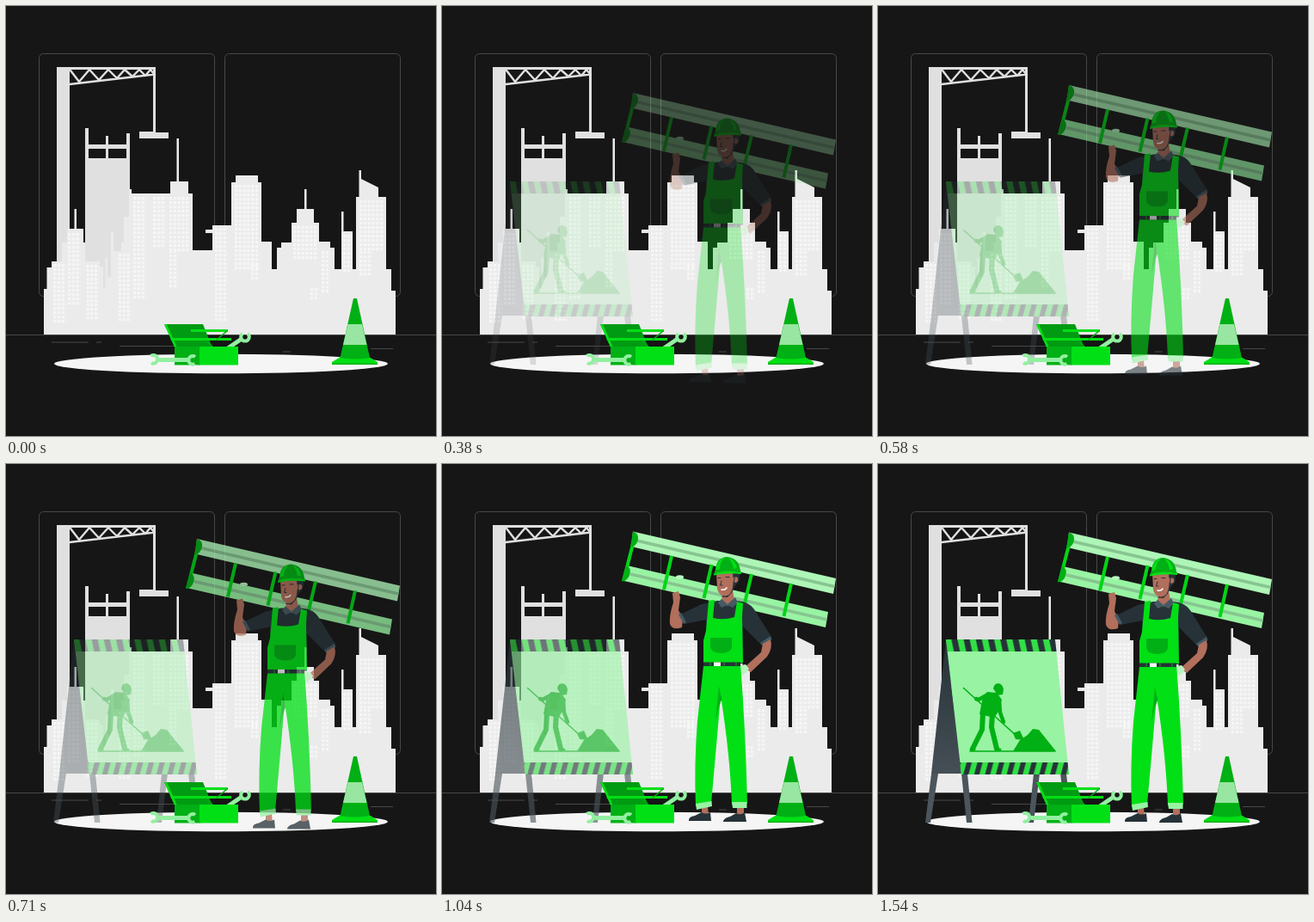
An HTML page that plays this animation: 500x500 px, repeating every 1620 ms.

```html
<!DOCTYPE html>
<html lang="en">
<head>
<meta charset="utf-8">
<title>Under construction</title>
<style>
  html, body { margin: 0; width: 100%; height: 100%; overflow: hidden; background: #161616; }
  svg { display: block; width: 100%; height: 100%; }
  .dark { fill: #263238; }
  .slate { fill: #455a64; }
  .lime { fill: #00e015; }
  .green { fill: #00b014; }
  .pale { fill: #98f3a3; }
  .skin { fill: #b16f5c; }
  .line { fill: none; stroke-linecap: round; stroke-linejoin: round; }
</style>
</head>
<body>
<svg viewBox="0 0 500 500">
  <defs>
    <pattern id="panes" width="4.8" height="5" patternUnits="userSpaceOnUse">
      <rect width="3.2" height="3.2" fill="#f6f6f6"/>
    </pattern>
    <pattern id="topTape" width="14.2" height="14" x="80" y="204" patternUnits="userSpaceOnUse" patternTransform="skewX(12) translate(-43 0)">
      <rect width="14.2" height="14" fill="#32e045"/><rect x="5" width="7" height="14" class="dark"/>
    </pattern>
    <pattern id="lowTape" width="12.6" height="14" x="97" y="347" patternUnits="userSpaceOnUse" patternTransform="skewX(-15) translate(93 0)">
      <rect width="12.6" height="14" fill="#32e045"/><rect x="6" width="6" height="14" class="dark"/>
    </pattern>
    <linearGradient id="side" x2="0" y2="1">
      <stop stop-color="#263238"/><stop offset="1" stop-color="#454f55"/>
    </linearGradient>
  </defs>

  <g fill="none" stroke="#484848">
    <rect x="38.5" y="55.5" width="204" height="282" rx="5"/>
    <rect x="254.5" y="55.5" width="204" height="282" rx="5"/>
    <path d="M0 382.5H500M53 391H96M105 391H111M132 395.500H200M322 402H331M424 398.500H450"/>
  </g>

  <!-- crane and unfinished tower -->
  <g fill="#e0e0e0">
    <path d="M59 71H174V147H189V154H155V146H171V74H74V382H59Z"/>
    <path class="line" stroke="#e0e0e0" stroke-width="2.400" d="M74 91L173 79.500M75 75L85 88L97 74L108 86L119 74L129 84L138 74L147 82L155 74L162 81L168 74L172 79"/>
    <path d="M92 142H96V161H116V151H119V161H140V148H144V382H92ZM96 166V177H116V166ZM119 166V177H140V166Z" fill-rule="evenodd"/>
  </g>

  <!-- skyline -->
  <path fill="#ebebeb" d="M44 382V329H47.500V304H53V297H65V275H71V259H79.500V236H82V259H90V275H92V297H109V303H113V328H115.500V293H118V315H122V262H125V285H130V285H134V275H137V245H143V213H146V218H191V204H198.500V154H201V204H212V218H217V284H240V264H232V260H240V255H262V205H267V197H293V205H297V274H309V306H315V281H320V275H332V252H338V236H347V213H349.500V236H358V252H364V274H377V281H382V306H390V239H392.500V262H403V306H407V222H410.500V191H413V201L433 211V222H442V306H448V331H453V382Z"/>
  <g id="windows" fill="url(#panes)"></g>

  <ellipse cx="250" cy="416" rx="194" ry="11.300" fill="#f5f5f5"/>

  <!-- warning sign -->
  <g id="sign">
    <path fill="#4b555b" d="M62 360H70L61 417H55ZM97 360H104L109.500 417H103ZM181 360H188L181 417H175ZM212 360H219L225 417H219Z"/>
    <path fill="url(#side)" d="M79 205L62 360H98Z"/>
    <path class="pale" d="M79 204H206L222 361H97Z"/>
    <path fill="url(#topTape)" d="M79 204H206L207.500 218H81Z"/>
    <path fill="url(#lowTape)" d="M95 347H220.500L222 361H97Z"/>
    <g class="green">
      <path d="M134 261Q135 255 140 255Q145 256 146 262L145 268L139 269ZM122 270L127 265L138 266L144 274L140 288L135 295L118 291Z"/>
      <path d="M157 334L165 321L174 315L180 308L187 309L195 319L207 334Z"/>
      <path d="M157 313L165 310L170 321L160 320Z"/>
      <g class="line" stroke="#00b014">
        <path stroke-width="1.600" d="M107 334H206M99.500 260.500L162 317"/>
        <path stroke-width="4.500" d="M126 269L117 274L114 273M141 275L142 289L146 300"/>
        <path stroke-width="6" d="M122 290L121 309L110 331M133 290L132 306L138 331"/>
        <path stroke-width="3" d="M108 332H112M137 332H142"/>
      </g>
    </g>
  </g>

  <!-- toolbox -->
  <g>
    <path fill="none" stroke="#92efa0" stroke-width="5" d="M255 400L274 387"/>
    <path fill="none" stroke="#92efa0" stroke-width="4" d="M281 381A4.800 4.800 0 1 1 275 381"/>
    <path fill="#009b12" d="M184 370H229L240 397H197Z"/>
    <path class="lime" d="M184 370H187L199 397H196ZM215 376H258V379H215ZM191 386H262V389H192Z"/>
    <path class="line" stroke="#00a914" stroke-width="1.500" d="M257 378L245 388M232 389L240 396"/>
    <path class="green" d="M196 396H226V417.500H196Z"/>
    <path class="lime" d="M225 396H270V417.500H225Z"/>
    <g fill="none" stroke="#92efa0">
      <path stroke-width="5" d="M178 411.500H211"/>
      <path stroke-width="4" d="M168.500 407A4.800 4.800 0 1 1 169 415M220 408A4.800 4.800 0 1 0 219.500 416"/>
    </g>
  </g>

  <!-- cone -->
  <path class="lime" d="M379 414L389 408H422L432 414V417H379Z"/>
  <path class="green" d="M404 340H408L423 409Q406 412 388.500 409ZM379 415.500H432V417H379Z"/>
  <path fill="#98e6a1" d="M397.500 370H414L419.500 394H392Z"/>

  <!-- worker carrying a ladder -->
  <g id="worker">
    <path fill="#aef5b7" d="M222 79.500L458 134L455 152L220 97Z"/>
    <path class="pale" d="M215 119L449 173L446 191L212 137Z"/>
    <path fill="none" stroke="#87c590" stroke-width="3.500" d="M226 90L456.500 143.500M219 129L447.500 182"/>
    <path fill="none" stroke="#00d615" stroke-width="4" d="M222 94L211 137M267 108L258 147M313.500 118L304.500 157M360 129L351 167M406 140L397.500 178"/>
    <path class="green" d="M222 79.500Q229 81 228 89Q226 97 219 98ZM214 119Q220 121 218.500 129Q216 137 209 137.500Z"/>

    <path class="skin" d="M268 151L275 149L277 156L275 171L280 181L279 191Q268 195 265 187Q264 177 269 162Z"/>
    <ellipse cx="276.500" cy="132.500" rx="4.500" ry="2.200" fill="#b9f7c1"/>
    <path class="dark" d="M277 176L302 164L320 160H343Q357 161 363 170L383 202L371 211L350 190V233H307V182L282 187Z"/>
    <path class="slate" d="M275 176L278 174L284 185L281 187ZM382 201L383.500 205L372 212L370 209Z"/>
    <path class="skin" d="M373 210L382 205Q385 215 378 225L359 243L351 238L371 220Z"/>
    <path fill="#b9f3c0" d="M348 235L353 234L357 239L354 243L349 247Z"/>

    <path class="skin" d="M327 147H338L340 160L332 166L325 159Z"/>
    <path class="slate" d="M325 158L332 164L341 156L344 162L338 168L332 165L325 168L321 162Z"/>
    <path class="dark" d="M337 127L346 126Q347 138 342 141L336 150L332 156L326 155L337 142Z"/>
    <path class="skin" d="M319 127H338L339 143Q336 154 329 155Q321 153 320 146Z"/>
    <circle class="skin" cx="341" cy="135.500" r="3.300"/>
    <path class="line" stroke="#263238" stroke-width="1" d="M341 128L338 147Q335 157 326 155M321 133.500H324M330 132.500H334M325 137L323.500 142H326"/>
    <path class="line" stroke="#fff" stroke-width="1.500" d="M325 147Q329 148 331 145"/>
    <path class="green" d="M316 129L318 124Q319 110 331 109Q345 110 347 125L348 127Q334 125 316 129Z"/>
    <path class="lime" d="M318 124Q320 112 329 109.500Q323 115 323 123ZM316 129Q328 123 348 127V129Q331 127 316 130.500ZM333 110Q341 112 343 122L339 123Q338 115 333 110Z"/>

    <path class="skin" d="M302 399H309L310 411H302ZM343 398H351V411H343Z"/>
    <path class="dark" d="M287 415Q287 411 294 410L302 406Q306 409 312 406L313 416H287ZM327 416Q329 412 335 411L342 407Q347 410 352 406L354 417H327Z"/>

    <path class="lime" d="M310 160L317 159L315 180Q328 183 340 179L343 161L350 163L349 179L350 232H347Q353 310 355 396L337 397Q335 340 324 270Q319 330 313 396L295 399Q293 350 297 300L304 236V206L307 195Z"/>
    <path class="green" d="M312 203H337V214Q336 221 324 221Q312 220 312 213ZM322 259L325 275L322 283L318 300Z"/>
    <path class="pale" d="M295 396L313.500 393L314 399L296 403ZM337 394H354.500V401H338Z"/>
    <path class="dark" d="M304 231.500H347V236H304Z"/>
    <path fill="#f5f5f5" d="M316 231.500H324V236H316Z"/>
    <path fill="none" stroke="#00b014" d="M312 231V237M328 231V237M342 231V237"/>
  </g>
</svg>
<script>
const LOOP = 1620, FPS = 24;
const byId = id => document.getElementById(id);
const sign = byId('sign'), worker = byId('worker');

// x, y, columns, rows of lit windows
const blocks = [
  [55, 300, 3, 14], [72, 264, 3, 17], [93.500, 301, 3, 13], [131, 288, 3, 16],
  [148, 222, 3, 24], [171, 222, 3, 12], [190, 222, 5, 13], [190, 284, 2, 9],
  [243, 258, 3, 22], [266, 208, 6, 20], [285, 300, 2, 4], [334, 256, 6, 8],
  [367, 285, 2, 10], [354, 328, 2, 3], [392, 266, 2, 9], [411, 226, 6, 12], [411, 285, 3, 6]
];
byId('windows').innerHTML = blocks.map(([x, y, cols, rows]) =>
  `<rect width="${cols * 4.8}" height="${rows * 5}" transform="translate(${x} ${y})"/>`).join('');

const clamp = v => Math.min(1, Math.max(0, v));

function bezier(x1, y1, x2, y2) {
  const at = (a, b, u) => 3 * (1 - u) ** 2 * u * a + 3 * (1 - u) * u * u * b + u ** 3;
  return x => {
    let lo = 0, hi = 1;
    for (let i = 0; i < 24; i++) {
      const mid = (lo + hi) / 2;
      if (at(x1, x2, mid) < x) lo = mid; else hi = mid;
    }
    return at(y1, y2, lo);
  };
}
const overshoot = bezier(.36, -.01, .5, 1.38);

function draw(ms) {
  const t = Math.floor((ms + 4) * FPS / 1000) * 1000 / FPS;
  const hidden = t < 120;
  const rise = overshoot(clamp((t + 48) / 1500));
  worker.setAttribute('opacity', hidden ? 0 : clamp(rise));
  worker.setAttribute('transform', `translate(0 ${30 * (1 - rise)})`);
  sign.setAttribute('opacity', hidden ? 0 : clamp((t + 45) / 1585) ** 1.3);
}

const start = performance.now();
function tick() {
  draw((performance.now() - start) % LOOP);
  requestAnimationFrame(tick);
}
tick();
</script>
</body>
</html>
```
